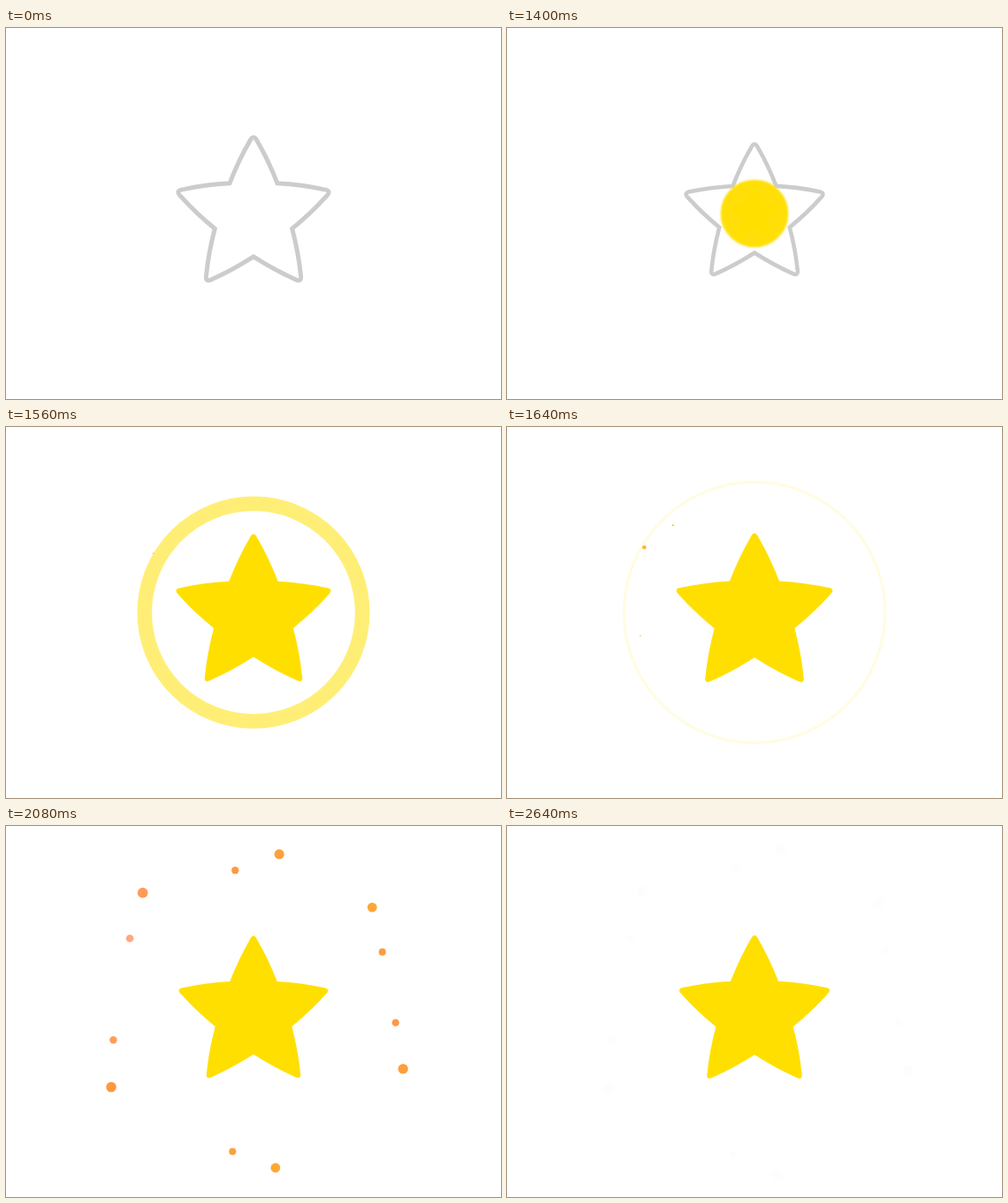
Animation of 560 by 420 pixels, one loop 3620 ms. Source, as an HTML page with a canvas:

```html
<!DOCTYPE html>
<html lang="en">
<head>
<meta charset="utf-8">
<title>Star burst</title>
<style>
  html, body { margin: 0; width: 100%; height: 100%; overflow: hidden; background: #fff; }
  canvas { display: block; }
</style>
</head>
<body>
<canvas id="stage" width="560" height="420"></canvas>
<script>
const ctx = document.getElementById('stage').getContext('2d');
const LOOP = 3620, LAST_CHANGE = 2640;
const YELLOW = '#ffdf00';

// [angle clockwise from top in degrees, start time in ms]
const bigDots = [[9.3, 1734], [48.7, 1771], [111, 1712], [172, 1771], [242, 1679], [317, 1614]];
const smallDots = [[-7.4, 1663], [65.2, 1693], [94.5, 1654], [188.5, 1712], [258.5, 1612], [300.6, 1532]];

const clamp = (v, lo = 0, hi = 1) => Math.min(hi, Math.max(lo, v));
const progress = (t, from, to) => clamp((t - from) / (to - from));
const mix = (a, b, p) => a + (b - a) * p;
const easeInOut = p => (1 - Math.cos(Math.PI * p)) / 2;

function makeStar() {
  const star = new Path2D();
  for (let arm = 0; arm < 5; arm++) {
    const a = arm * Math.PI * 0.4;
    // along = distance up the arm's axis, side = offset across it
    const at = (along, side) => [
      along * Math.sin(a) + side * Math.cos(a),
      3 - along * Math.cos(a) + side * Math.sin(a)
    ];
    if (arm === 0) star.moveTo(...at(37.2, -27));
    star.quadraticCurveTo(...at(64, -16.5), ...at(84.5, -4.5));
    star.bezierCurveTo(...at(91, -1.5), ...at(91, 1.5), ...at(84.5, 4.5));
    star.quadraticCurveTo(...at(64, 16.5), ...at(37.2, 27));
  }
  star.closePath();
  return star;
}
const star = makeStar();

function drawScaled(scale, paint) {
  ctx.save();
  ctx.scale(scale, scale);
  paint();
  ctx.restore();
}

function drawOutline(t) {
  if (t >= 1540) return;
  drawScaled(1 - Math.max(0, t - 1200) * 0.00045, () => {
    ctx.strokeStyle = '#ccc';
    ctx.lineWidth = 5;
    ctx.stroke(star);
  });
}

function drawRing(t) {
  const u = progress(t, 1350, 1660);
  if (u <= 0 || u >= 1) return;
  const outer = 150 * Math.sin(u * Math.PI / 2);
  const width = Math.min(outer, 52 * (1 - u));
  ctx.save();
  ctx.filter = `blur(${1.3 * Math.cos(u * Math.PI / 2)}px)`;
  ctx.globalAlpha = 1 - u * u;
  ctx.strokeStyle = YELLOW;
  ctx.lineWidth = width;
  ctx.beginPath();
  ctx.arc(0, 0, outer - width / 2, 0, 2 * Math.PI);
  ctx.stroke();
  ctx.restore();
}

function starScale(t) {
  if (t < 1590) return 1.045 * (1 - (1 - progress(t, 1360, 1590)) ** 2);
  if (t < 1860) return mix(1.045, 0.975, easeInOut(progress(t, 1590, 1860)));
  return mix(0.975, 1, easeInOut(progress(t, 1860, 2220)));
}

function drawStar(t) {
  if (t <= 1360) return;
  drawScaled(starScale(t), () => {
    ctx.fillStyle = YELLOW;
    ctx.fill(star);
  });
}

function drawDots(t, dots, reach, size) {
  for (const [degrees, start] of dots) {
    const age = t - start;
    if (age <= 0) continue;
    const p = 1 - Math.exp(-age / 150);
    const distance = mix(125, reach, p);
    const angle = degrees * Math.PI / 180;
    const tint = progress(age, 200, 870);
    const alpha = clamp((870 - age) / 470, 0.015, 0.95);
    ctx.fillStyle = `rgba(255, ${mix(178, 80, tint)}, ${mix(30, 110, tint)}, ${alpha})`;
    ctx.beginPath();
    ctx.arc(distance * Math.sin(angle), -distance * Math.cos(angle), size * p, 0, 2 * Math.PI);
    ctx.fill();
  }
}

function render(now) {
  const t = Math.min(now % LOOP, LAST_CHANGE);
  ctx.setTransform(1, 0, 0, 1, 0, 0);
  ctx.fillStyle = '#fff';
  ctx.fillRect(0, 0, 560, 420);
  ctx.translate(280, 210);
  drawOutline(t);
  drawRing(t);
  drawStar(t);
  drawDots(t, bigDots, 186.5, 6.2);
  drawDots(t, smallDots, 163.5, 4.4);
}

const origin = performance.now();
function tick() {
  render(performance.now() - origin);
  requestAnimationFrame(tick);
}
tick();
</script>
</body>
</html>
```
